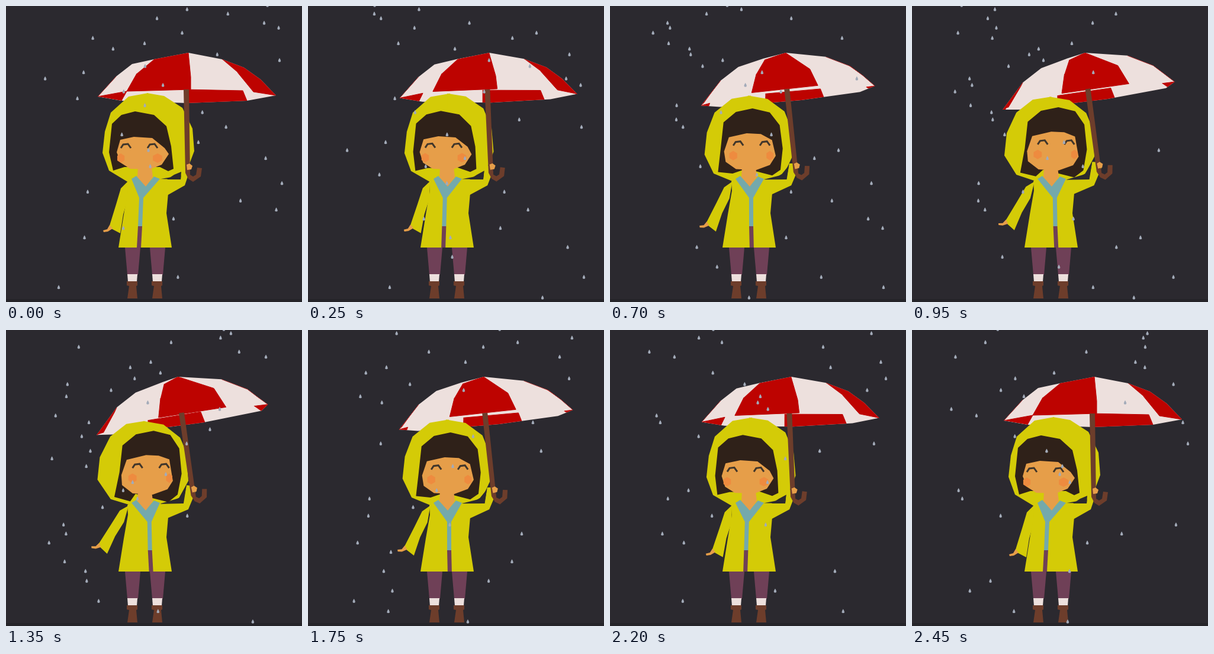
These frames come from a looping animation (500 px wide and 500 px high, 2500 ms). An HTML page with a canvas:

```html
<!DOCTYPE html>
<html lang="en">
<head>
<meta charset="utf-8">
<title>Girl in the rain</title>
<style>
  html, body { margin: 0; width: 100%; height: 100%; overflow: hidden; background: #2b292f; }
  canvas { display: block; width: 100vw; height: 100vh; }
</style>
</head>
<body>
<canvas id="stage" width="500" height="500"></canvas>
<script>
const ctx = document.getElementById('stage').getContext('2d');
const STEP = 50, STEPS = 50;
const SKY = '#2b292f', YELLOW = '#d4cb07', HAIR = '#2f2119', SKIN = '#e69e49', BLUSH = '#ee8b3f',
  RED = '#bd0300', WHITE = '#ede0dd', BROWN = '#6d3d2b', PURPLE = '#6f4057', TEAL = '#74a9ab';

let dip = 0;   // 0 upright, 1 fully tilted
let sway = 0;  // sideways motion runs ahead of the dip

const points = text => text.split(/[ ,]+/).map(Number);

// A part bends from its upright to its tilted outline; `lead` eases its sideways motion.
const part = (upright, tilted, lead = 0.7) => ({ from: points(upright), to: points(tilted), lead });
const bend = ({ from, to, lead }) =>
  from.map((v, i) => v + (to[i] - v) * (i % 2 ? dip : dip ** lead));

const canopy = part(
  '155,153 186,119 213,98 250,90 308,79 365,90 402,104 430,124 456,151 407,160 306,164 195,160',
  '153,178 187,131 219,106 265,88 290,79 364,83 408,100 425,113 442,125 432,136 334,156 180,177', 1);
const redPanels = [
  part('155,153 204,144 195,160', '153,178 154,177 154,178'),
  part('301,141 400,143 407,160 301,165', '238,153 327,138 334,156 237,168', 1),
  part('456,151 456,151 456,151', '418,128 442,125 431,137', 1),
  part('250,90 308,79 312,120 312,141 204,144 221,114', '267,92 290,79 352,98 373,130 259,148 262,115', 0.9),
  part('365,90 402,104 430,124 456,151 418,145 391,112', '364,83 408,100 425,113 442,125 452,112 410,92', 1),
  part('155,153 186,119 186,110 146,150', '153,178 187,131 183,140 165,174', 1)
];

const hoodLeft = part(
  '240,147 207,153 177,180 167,212 163,248 174,278 207,298 240,294',
  '234,154 203,159 176,180 158,215 154,253 177,286 211,296 240,294', 2);
const hoodRight = part(
  '238,147 267,152 298,172 315,207 318,245 303,285 262,292 238,294',
  '232,154 266,160 294,182 304,205 308,255 292,284 262,293 232,294', 0.35);
const hair = part(
  '218,178 195,184 179,199 174,247 181,278 200,272 260,272 274,279 283,275 279,237 271,203 250,184',
  '250,170 220,176 197,195 192,240 183,282 210,290 218,277 274,291 290,278 297,243 293,200 278,177');
const face = part(
  '193,226 216,221 247,223 268,240 275,250 263,268 243,276 210,275 194,265 187,247',
  '204,219 237,211 258,212 276,218 282,255 273,269 248,278 214,276 196,262 195,245');
const rightSleeve = part(
  '258,292 295,293 297,272 304,270 308,285 302,303 272,320',
  '255,294 300,293 305,262 318,263 321,272 308,303 270,319');
const sleeveGap = part('272,293 284,285 296,280 295,293', '276,293 293,283 305,262 299,293');

const coat = points('205,296 211,290 260,291 274,316 271,350 280,408 190,408 199,352 206,312');
const neck = points('223,272 246,272 248,289 236,305 222,289');
const leftSleeve = points('206,296 194,308 186,335 174,374 193,384 198,352 206,325');
const leftHand = points('175,370 180,376 172,381 165,382 164,379 171,377');
const handle = points('300,141 309,141 311,285 316,288 321,285 323,273 331,274 329,288 316,297 308,292 303,282');
const rightHand = points('305,268 310,266 315,270 313,276 306,277');

function trace(outline) {
  ctx.beginPath();
  for (let i = 0; i < outline.length; i += 2) ctx.lineTo(outline[i], outline[i + 1]);
}

function fill(color, outline) {
  trace(outline);
  ctx.fillStyle = color;
  ctx.fill();
}

function turned(degrees, x, y, paint) {
  ctx.save();
  ctx.translate(x, y);
  ctx.rotate(degrees * Math.PI / 180);
  ctx.translate(-x, -y);
  paint();
  ctx.restore();
}

function random(seed) {
  const v = Math.sin(seed * 12.9898) * 43758.5453;
  return v - Math.floor(v);
}

// Two drops start per step and accelerate; far ones stop at the canopy.
function drawRain(step, behind) {
  ctx.fillStyle = '#a3abb9';
  for (let i = 0; i < 139; i++) {
    if (random(i + 0.5) < 0.3 !== behind) continue;
    const x = 66 + 402 * random(i + 1);
    const age = 33 - i / 2 + step;
    const y = 0.537 * age * age - 92;
    const caught = behind && x > 160 && x < 445 && y > 120;
    if (age < 0 || y < -4 || y > 495 || caught) continue;
    ctx.beginPath();
    ctx.moveTo(x, y - 4);
    ctx.quadraticCurveTo(x + 4.5, y + 3, x, y + 3);
    ctx.quadraticCurveTo(x - 4.5, y + 3, x, y - 4);
    ctx.fill();
  }
}

function drawCanopy() {
  ctx.save();
  fill(WHITE, bend(canopy));
  ctx.clip();
  ctx.strokeStyle = RED;
  ctx.lineWidth = 1;
  for (const panel of redPanels) {
    fill(RED, bend(panel));
    ctx.stroke();
  }
  ctx.restore();
}

function drawLeg(x) {
  const at = outline => outline.map((v, i) => i % 2 ? v : v + x);
  fill(PURPLE, at([-12, 408, 14, 408, 10, 454, -8, 454]));
  fill(WHITE, at([-8, 453, 9, 453, 8, 466, -7, 466]));
  fill(BROWN, at([-9, 465, 9, 465, 9, 472, 7, 473, 9, 494, -8, 494, -5, 473, -9, 472]));
}

function drawCheek(x, y, rx, ry) {
  const hexagon = [];
  for (let a = Math.PI / 6; a < 2 * Math.PI; a += Math.PI / 3) {
    hexagon.push(x + rx * Math.cos(a), y + ry * Math.sin(a));
  }
  fill(BLUSH, hexagon);
}

function drawEye(x, y) {
  trace([x - 8, y + 4, x - 4, y - 2, x + 4, y - 3, x + 9, y + 4]);
  ctx.strokeStyle = '#40362b';
  ctx.lineWidth = 3;
  ctx.stroke();
}

function drawHead() {
  fill(YELLOW, bend(hoodLeft));
  fill(YELLOW, bend(hoodRight));
  fill(HAIR, bend(hair));
  fill(SKIN, bend(face));
  ctx.save();
  ctx.translate(20 * sway, -7 * dip);
  drawCheek(194, 257, 7 + sway, 8);
  drawCheek(256, 257, 9 - 3 * sway, 8);
  drawEye(202, 236);
  drawEye(247, 236);
  ctx.restore();
}

function drawCoat() {
  turned(16 * dip, 204, 300, () => {
    fill(YELLOW, leftSleeve);
    fill(SKIN, leftHand);
  });
  fill(YELLOW, coat);
  fill(YELLOW, bend(rightSleeve));
  fill(SKY, bend(sleeveGap));

  // The opening slides further the lower it is.
  const top = 228.5 + 14 * sway, waist = 226.5 + 17 * sway, hem = 224.5 + 21 * sway;
  fill(TEAL, [212, 292, 220, 287, 236, 304, 250, 288, 260, 292,
    top + 3.5, 324, waist + 3.5, 372, waist - 3.5, 372, top - 3.5, 324]);
  fill(PURPLE, [waist - 3.5, 372, waist + 3.5, 372, hem + 3.5, 408, hem - 3.5, 408]);
  fill(SKIN, neck);
}

function draw(step) {
  dip = (1 - Math.cos(2 * Math.PI * step / (STEPS - 1))) / 2;
  sway = dip ** 0.7;
  ctx.fillStyle = SKY;
  ctx.fillRect(0, 0, 500, 500);
  ctx.fillStyle = '#252429';
  ctx.fillRect(0, 495, 500, 5);
  drawRain(step, true);
  drawCanopy();
  drawLeg(213);
  drawLeg(255);
  drawHead();
  drawCoat();
  turned(-7.3 * sway, 306, 204, () => {
    ctx.translate(0, -2 * dip);
    fill(BROWN, handle);
    fill(SKIN, rightHand);
  });
  drawRain(step, false);
}

function tick() {
  draw(Math.floor((performance.now() - start) / STEP) % STEPS);
  requestAnimationFrame(tick);
}
const start = performance.now();
tick();
</script>
</body>
</html>
```
